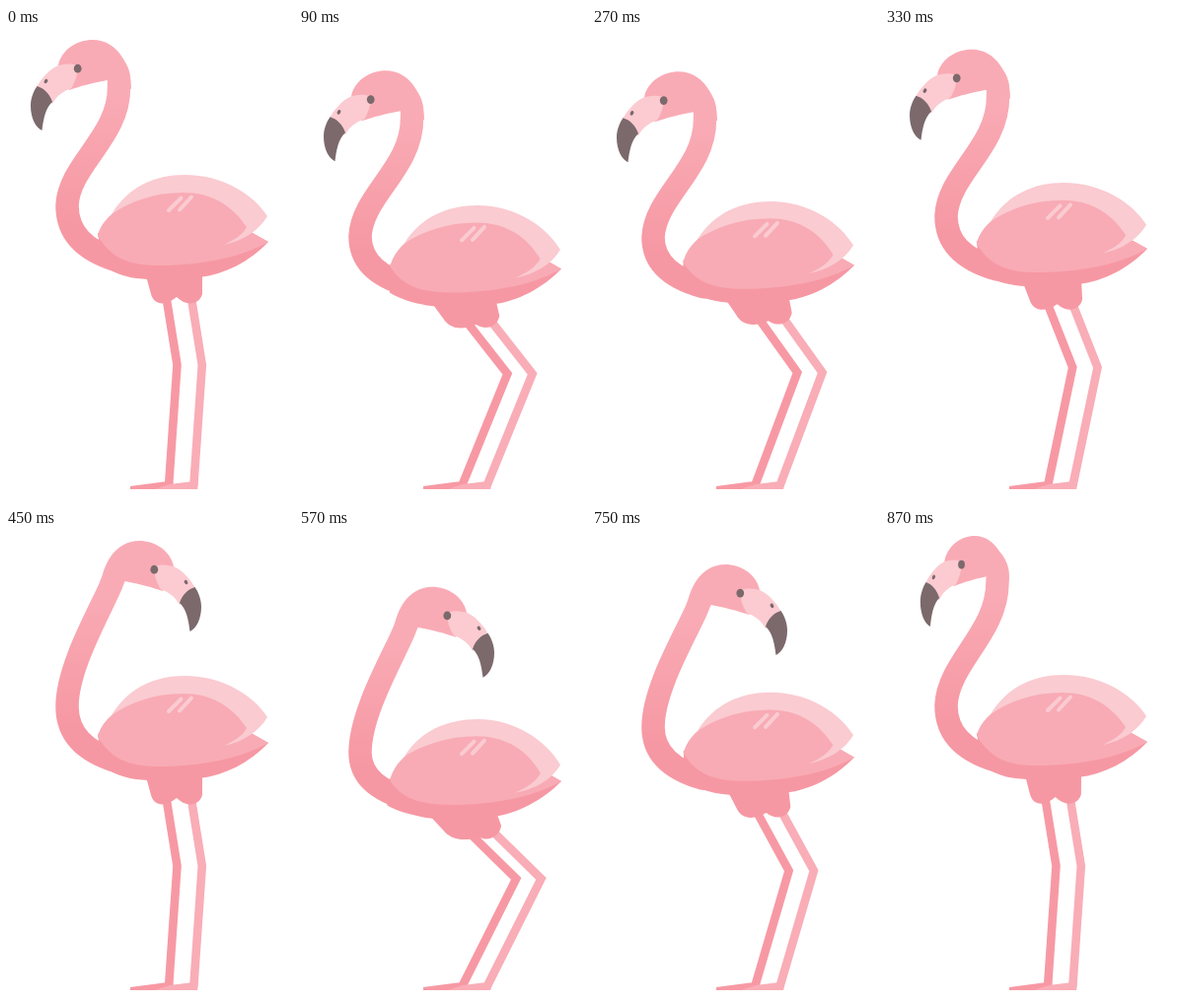
These frames come from a looping animation (291 px wide and 480 px high, 900 ms). An HTML page:

```html
<!DOCTYPE html>
<html lang="en">
<head>
<meta charset="utf-8">
<title>Flamingo</title>
<style>
  html, body { margin: 0; width: 100%; height: 100%; overflow: hidden; background: #fff; }
  svg { display: block; width: 100%; height: 100%; }
  .line { fill: none; stroke-miterlimit: 8; }
  .round { stroke-linecap: round; stroke-linejoin: round; }
</style>
</head>
<body>
<svg viewBox="0 0 291 480">
  <defs>
    <linearGradient id="fade" x1="0" y1="0" x2="0" y2="1">
      <stop offset=".15" stop-color="#f9abb5"/>
      <stop offset=".82" stop-color="#f698a3"/>
    </linearGradient>
  </defs>
  <path id="farLeg" class="line" stroke="#f799a4" stroke-width="8.6"/>
  <path fill="#f799a4" d="M126 465L160 460.5H169.3V468H126Z"/>
  <path id="nearLeg" class="line" stroke="#f9adb7" stroke-width="8.6"/>
  <path fill="#f9adb7" d="M151 468L166 463L186 460.5H194.3V468Z"/>
  <path id="thighs" fill="#f698a3"/>
  <path id="neck" class="line round" stroke="url(#fade)" stroke-width="23.5"/>
  <path id="body" fill="#f698a3"/>
  <path id="wing" fill="#f8abb5"/>
  <path id="feather" fill="#facbd1"/>
  <path id="shine" class="line round" stroke="#facbd1" stroke-width="4"/>
  <g id="head">
    <path fill="#f9abb5" d="M102.5 53C86 56 76 59 64 63L53 38C56 22 72 12 88 12C113 12 127 38 127 62Z"/>
    <path fill="#fbcbd1" d="M31 60C36 51 44 42 53 38C60 36 67 36 73 38C73 47 70 55 66 61.5C58 64 51 69 47 77Z"/>
    <path fill="#7b696c" d="M31.5 59C38 61 44 66 47 75C40 81 38 92 36.5 104C30 101 25 91 25 79C25 71 28 64 31.5 59Z"/>
    <ellipse cx="40.5" cy="54" rx="1.7" ry="2.4" transform="rotate(30 40.5 54)" fill="#7b696c"/>
    <ellipse cx="72.7" cy="41.2" rx="3.9" ry="4.4" fill="#7b696c"/>
  </g>
</svg>
<script>
const LOOP = 900, BEAT = 450, STEP = 30, AXIS = 111.5;
const $ = id => document.getElementById(id);

// Standing and crouching outlines
const poses = {
  thighs: ['M141 248L147 270C150 281 161 283 173 273C183 283 196 281 199 270L199 248Z',
           'M124 290L146 311C154 320 166 323 184 319C194 323 205 317 206 306L199 290Z'],
  body: ['M93 208L250 208L266 217C247 237 222 250 196 253C172 256 148 256 132 254C118 252 108 248 98 240Z',
         'M92 260L257 257L266 262C247 281 222 295 196 298C172 302 148 302 128 299C112 296 100 293 88 287Z'],
  wing: ['M93 211C97 192 124 166 182 166C215 166 240 190 250 208L266 217C240 232 200 241 155 241C122 241 106 232 93 211Z',
         'M92 262C98 238 124 216 182 216C215 216 244 238 257 257L266 262C240 277 200 286 155 286C120 286 103 279 92 262Z'],
  feather: ['M107 189C124 161 151 149 181 149C221 149 252 170 265 191C256 206 240 216 221 220C231 215 239 211 244 202C228 178 206 167 180 167C150 167 126 176 107 189Z',
            'M107 237C124 211 151 200 181 200C221 200 252 224 265 247C256 262 240 271 219 275C231 270 240 264 245 255C230 228 206 217 180 217C150 217 126 226 107 237Z'],
  shine: ['M165 185L177.5 172.5M176 184.5L188 171.5',
          'M165 235L177.5 222.5M176 234.5L188 221.5']
};
// Neck with the head facing left and right
const necks = ['M107 36C115 44 115 52 114.5 60C115 111 64 138 62 180C62 208 80 226 113 236',
               'M116 36C112 43 109 50 106 58C95 84 62 140 62 180C62 208 80 226 113 236'];
// Extra head height around each turn
const lifts = [[270, 0], [300, -3], [330, 1], [360, 6], [390, 9], [420, 4], [450, 0]];

const mix = (a, b, p) => a + (b - a) * p;
const clamp = p => Math.min(1, Math.max(0, p));
const wave = p => (1 - Math.cos(Math.PI * p)) / 2;
const cubic = p => p < .5 ? 4 * p ** 3 : 1 - 4 * (1 - p) ** 3;
const tokens = path => path.match(/[A-Z]|[\d.]+/g);

function morph([a, b], p) {
  const to = tokens(b);
  return tokens(a).map((v, i) => isNaN(v) ? v : mix(+v, +to[i], p).toFixed(2));
}

function track(keys, t) {
  const i = keys.findIndex(k => k[0] >= t);
  if (i < 1) return 0;
  const [t0, a] = keys[i - 1], [t1, b] = keys[i];
  return mix(a, b, (t - t0) / (t1 - t0));
}

function crouch(t) {
  if (t < 158) return wave(t / 158);
  if (t < 390) return 1 - wave((t - 158) / 232);
  return -.02 * Math.sin(Math.PI * (t - 390) / 60);
}

function leg(id, shift, w) {
  const k = 51 * Math.max(0, w) ** .6;
  const kneeY = 465 - Math.sqrt(123.4 ** 2 - (9 + k) ** 2);
  const hip = [mix(162, 172, w) + shift, mix(270, 312, w)];
  $(id).setAttribute('d', `M${hip}L${173.5 + k + shift} ${kneeY}L${165 + shift} 465`);
}

// The neck stretches between the lifted head and the body
function neckPath(turn, w, lift) {
  let isY = true;
  return morph(necks, turn).map(v => {
    if (isNaN(v)) return v;
    isY = !isY;
    if (!isY) return v;
    const y = +v;
    const drop = mix(57, 47, clamp((y - 180) / 57));
    return y + drop * w - lift * clamp((180 - y) / 110);
  }).join(' ');
}

function draw(time) {
  const t = time % BEAT;
  const w = crouch(t);
  const headW = crouch(Math.max(0, t - 6));
  const side = time < BEAT ? 1 : -1;
  const s = side * (1 - 2 * cubic(clamp((t - 330) / 120)));
  const lift = track(lifts, t);

  for (const id in poses) $(id).setAttribute('d', morph(poses[id], w).join(' '));
  leg('farLeg', 0, w);
  leg('nearLeg', 25.3, w);
  $('neck').setAttribute('d', neckPath((1 - s) / 2, headW, lift));
  $('head').setAttribute('transform',
    `translate(${AXIS} ${57 * headW - lift}) scale(${s} 1) translate(${-AXIS} 0)`);
}

const start = performance.now();
function tick() {
  const time = (performance.now() - start) % LOOP;
  draw(Math.floor(time / STEP) * STEP);
  requestAnimationFrame(tick);
}
tick();
</script>
</body>
</html>
```
